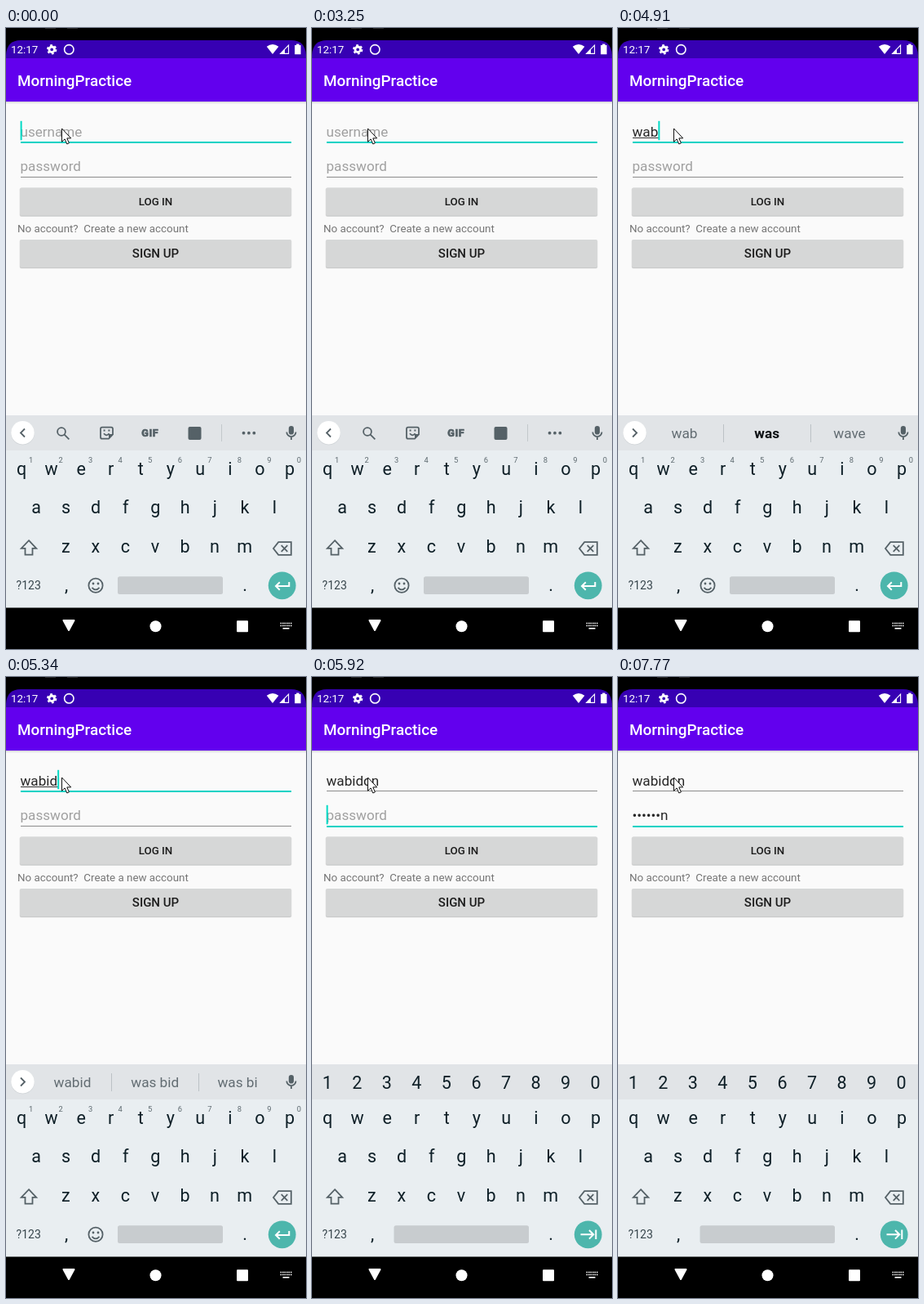
An HTML page for the animation above (8000 ms loop, 368 by 760 pixels).

```html
<!DOCTYPE html>
<html lang="en">
<head>
<meta charset="utf-8">
<title>Login form</title>
<style>
html, body { margin: 0; width: 100%; height: 100%; overflow: hidden; background: #000; }
svg { display: block; width: 100vw; height: 100vh; font-family: Roboto, sans-serif; }
text { white-space: pre; }
.mid { text-anchor: middle; }
.key { font-size: 21.5px; fill: #0e1f27; text-anchor: middle; }
.alt { font-size: 9.3px; fill: #5c686e; text-anchor: middle; }
.field { font-size: 17.1px; }
.sug { font-size: 17.2px; text-anchor: middle; }
.line { fill: none; stroke: #556167; stroke-width: 1.8; }
.solid { fill: #556167; }
.white { fill: none; stroke: #fff; stroke-width: 2; }
</style>
</head>
<body>
<svg viewBox="0 0 368 760">
  <defs>
    <linearGradient id="shade" x2="0" y2="1">
      <stop offset="0" stop-color="#d0d0d4"/><stop offset="1" stop-color="#fafafa"/>
    </linearGradient>
  </defs>
  <rect width="368" height="760"/>
  <path d="M48 0h13M75 0h13" stroke="#2a2a2a" stroke-width="2"/>
  <path d="M0 38V33Q1 15 18 15H350Q367 15 368 33V38Z" fill="#3700b3"/>
  <rect y="37" width="368" height="53" fill="#6200ee"/>
  <rect y="90" width="368" height="384" fill="#fafafa"/>
  <rect y="90" width="368" height="3" fill="url(#shade)"/>

  <!-- status bar -->
  <g fill="#fff">
    <text x="6" y="31" font-size="13.4">12:17</text>
    <circle cx="56.2" cy="26.3" r="3.3" fill="none" stroke="#fff" stroke-width="2.8"/>
    <circle cx="56.2" cy="26.3" r="5.2" fill="none" stroke="#fff" stroke-width="2" stroke-dasharray="2.7 2.745"/>
    <circle cx="77.3" cy="26.3" r="5.7" fill="none" stroke="#fff" stroke-width="1.6"/>
    <path d="M319.8 22.7Q327 17.4 334.4 22.7L327 32Z"/>
    <path d="M336.6 31.4L346.6 21V31.4Z" fill="none" stroke="#fff" stroke-width="1.1"/>
    <path d="M336 32L342 25.6V32Z"/>
    <path d="M354.2 21h2v-1.4h3.4v1.4h2v11.2h-7.4Z"/>
    <text x="14" y="71" font-size="18.9" font-weight="500">MorningPractice</text>
  </g>

  <!-- form -->
  <rect id="bar0" x="18" y="139" width="332"/>
  <rect id="bar1" x="18" y="182" width="332"/>
  <g id="buttons"></g>
  <text x="14" y="249.7" font-size="13.35" fill="#757575">No account?  Create a new account</text>
  <text id="user" class="field" x="17.5" y="132.5"></text>
  <rect id="compose" x="18" y="134" height="1" fill="#333"/>
  <text id="pass" class="field" x="17.5" y="175"></text>
  <rect id="caret" width="2" height="23.5" fill="#03dac5"/>
  <path d="M68.5 123V139.3L72.1 135.9 74.8 142 77.4 140.9 74.8 134.9H79.7Z" fill="#fff" stroke="#111"/>

  <!-- keyboard -->
  <rect y="474" width="368" height="236" fill="#e9eef1"/>
  <rect y="474" width="368" height="43" fill="#e1e4e7"/>
  <g id="keys"></g>
  <g id="alts"></g>
  <g id="digits"></g>

  <g id="strip">
    <circle cx="20.5" cy="496" r="14.4" fill="#d3d7da"/>
    <circle cx="20.5" cy="495.3" r="14.2" fill="#fff"/>
    <path id="chevron" class="line"/>
    <rect class="solid" x="346.8" y="487" width="6.2" height="10.5" rx="3.1"/>
    <path class="line" d="M344.3 494.5a5.6 5.6 0 0 0 11.2 0M349.9 500v4"/>
  </g>
  <g id="tools">
    <circle class="line" cx="68" cy="494" r="4.9"/>
    <path class="line" d="M71.600 497.600L77.400 503.400"/>
    <path class="line" d="M118 488.600H129Q131 488.600 131 490.600V497.500L126 502.700H118Q116 502.700 116 500.700V490.600Q116 488.600 118 488.600ZM120 496.300q3.300 4.200 6.600 0"/>
    <path class="solid" d="M119.600 491.500h2v2h-2zM125.400 491.500h2v2h-2zM131.700 497h-5.700v6z"/>
    <text class="solid mid" x="176.800" y="500" font-size="12.500" font-weight="900" letter-spacing=".7" stroke="#556167" stroke-width=".6">GIF</text>
    <rect class="solid" x="223.500" y="488" width="16" height="16" rx="2"/>
    <path d="M264.500 485V506" stroke="#c3c8cb"/>
    <g class="solid"><circle cx="291.500" cy="495.700" r="1.900"/><circle cx="297.900" cy="495.700" r="1.900"/><circle cx="304.300" cy="495.700" r="1.900"/></g>
  </g>
  <g id="words">
    <path d="M129.500 485V507M236.500 485V507" stroke="#bcc2c6"/>
    <text class="sug" x="81.500" y="502"></text>
    <text class="sug" x="182.700" y="502"></text>
    <text class="sug" x="284" y="502"></text>
  </g>

  <path class="line" d="M28 627.200L37.200 636.800H32.500V644.700H23.500V636.800H18.800Z"/>
  <path class="line" d="M334.200 629.200H349.800V644.800H334.200L328 637ZM337.700 633.200L345.300 640.800M345.300 633.200L337.700 640.800"/>
  <text x="27.700" y="687.200" class="mid" font-size="14" fill="#37454c">?123</text>
  <text x="74" y="688.500" class="key">,</text>
  <text x="293" y="688.500" class="key">.</text>
  <g id="smiley">
    <circle class="line" cx="110" cy="682.300" r="8.600"/>
    <path class="line" d="M105.500 684.800q4.500 5.200 9 0"/>
    <circle class="solid" cx="107" cy="680" r="1.400"/><circle class="solid" cx="113" cy="680" r="1.400"/>
  </g>
  <rect id="space" y="671.300" height="21.700" rx="2.500" fill="#c8cccf"/>
  <circle cx="338.700" cy="682.300" r="16.900" fill="#4db6ac"/>
  <path id="enter" class="white"/>

  <!-- navigation bar -->
  <rect y="709.500" width="368" height="50.500"/>
  <g fill="#fff">
    <path d="M70.500 725H83.500L77 737Z" stroke="#fff" stroke-width="2" stroke-linejoin="round"/>
    <circle cx="183.500" cy="732.300" r="7"/>
    <rect x="283" y="725.300" width="14" height="14" rx="1"/>
    <path d="M336.500 728.500h14M336.500 731.500h14" stroke="#fff" stroke-width="1.600" stroke-dasharray="1.600 .88"/>
    <path d="M339.500 734h8v1.600h-8z"/>
  </g>
</svg>
<script>
const $ = id => document.getElementById(id);
const LOOP = 8000, TO_PASS = 5920, NAME = 'wabidon';
const TEAL = '#03d2c4', HINT = '#a0a0a0', INK = '#262626';

// times at which each letter lands
const userKeys = [3800, 4080, 4910, 5190, 5340, 5490, 5620];
const passKeys = [6200, 6350, 6480, 6760, 7060, 7180, 7300];
const caretOff = [[310, 870], [1330, 1890], [2320, 2850], [3250, 3800], [4480, 4910], [7770, LOOP]];
const offers = [
  [3930, 'w', 'we', 'what', 1],
  [4080, 'wa', 'was', 'want', 1],
  [4910, 'wab', 'was', 'wave', 1],
  [5190, 'wabi', 'was I', 'was it'],
  [5340, 'wabid', 'was bid', 'was bi'],
  [5490, 'wabido', 'was in', 'was doing'],
  [5620, 'wabidon', 'was on', 'was done']
];

const label = (x, y, s, cls, extra = '') => `<text x="${x}" y="${y}" class="${cls}" ${extra}>${s}</text>`;
const row = (chars, x, y, cls) =>
  [...chars].map((c, i) => label(x + i * 36.55, y, c, cls)).join('');
const button = (y, s, size) =>
  `<rect x="16.5" y="${y}" width="334" height="35.5" rx="2.5" fill="#e6e6e6"/>
   <rect x="17" y="${y + 1}" width="333" height="34" rx="2" fill="#c8c9c9"/>
   <rect x="17" y="${y}" width="333" height="34" rx="2" fill="#d6d7d7"/>` +
  label(183.5, y + 17 + size * .36, s, 'mid', `font-size="${size}" font-weight="500" fill="#1c1c1c"`);

$('buttons').innerHTML = button(195.5, 'LOG IN', 13.3) + button(259, 'SIGN UP', 15);
$('keys').innerHTML = row('qwertyuiop', 19, 547, 'key') + row('asdfghjkl', 37, 594.3, 'key') + row('zxcvbnm', 73.3, 641.7, 'key');
$('alts').innerHTML = row('1234567890', 30.5, 532.3, 'alt');
$('digits').innerHTML = row('1234567890', 18.7, 504, 'key');

const set = (el, attrs) => { for (const k in attrs) el.setAttribute(k, attrs[k]); };
const show = (id, on) => $(id).style.display = on ? '' : 'none';
const count = (times, t) => times.filter(k => t >= k).length;

function fill(id, value, hint) {
  const el = $(id);
  el.textContent = value || hint;
  el.setAttribute('fill', value ? INK : HINT);
  return value ? el.getComputedTextLength() : 0;
}

function underline(id, focused) {
  set($(id), { height: focused ? 2 : 1, fill: focused ? TEAL : '#8c8c8c' });
}

function draw(t) {
  const onPass = t >= TO_PASS;
  const n = count(passKeys, t);
  const user = NAME.slice(0, count(userKeys, t));
  const pass = n ? '•'.repeat(n - 1) + NAME[n - 1] : '';
  const userW = fill('user', user, 'username');
  const passW = fill('pass', pass, 'password');

  underline('bar0', !onPass);
  underline('bar1', onPass);
  show('compose', user && !onPass);
  $('compose').setAttribute('width', userW);

  set($('caret'), { x: 17.6 + (onPass ? passW : userW), y: onPass ? 156.8 : 113.8 });
  show('caret', !caretOff.some(([a, b]) => t >= a && t < b));

  const offer = onPass ? null : offers.filter(o => t >= o[0]).pop();
  show('strip', !onPass);
  show('tools', !onPass && !offer);
  show('words', offer);
  show('digits', onPass);
  show('alts', !onPass);
  show('smiley', !onPass);
  $('chevron').setAttribute('d', offer ? 'M18 490.5L23 495.5 18 500.5' : 'M23 490.5L18 495.5 23 500.5');
  if (offer) {
    $('words').querySelectorAll('text').forEach((el, i) => {
      const strong = i === 1 && offer[4];
      el.textContent = offer[i + 1];
      set(el, { fill: strong ? '#0b0f12' : '#626c72', 'font-weight': strong ? 700 : 400 });
    });
  }

  const left = onPass ? 100.5 : 137;
  set($('space'), { x: left, width: 266 - left });
  $('enter').setAttribute('d', onPass
    ? 'M329.5 682.3H345M340 677L345.3 682.3 340 687.6M348.3 676.5V688'
    : 'M347.3 678V683H331.5M335.8 678.3L331 683 335.8 687.7');
}

function tick(now) {
  draw(now % LOOP);
  requestAnimationFrame(tick);
}
draw(0);
requestAnimationFrame(tick);
</script>
</body>
</html>
```
